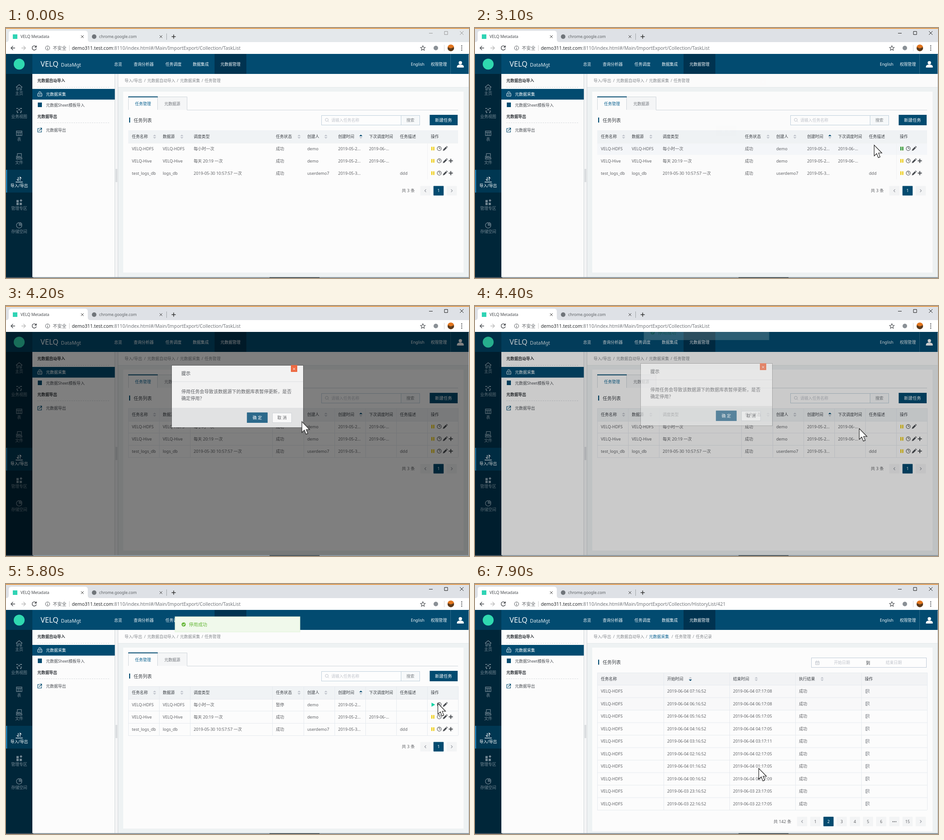
An HTML page that plays this animation: 1019x550 px, repeating every 8 s.

```html
<!DOCTYPE html>
<html lang="zh-CN">
<head>
<meta charset="utf-8">
<title>VELQ Metadata</title>
<style>
html, body { margin: 0; width: 100%; height: 100%; overflow: hidden; background: #fff; }
svg { display: block; width: 1019px; height: 550px; }
text { font-family: "Noto Sans", "Noto Sans CJK SC", "Noto Sans CJK", sans-serif; white-space: pre; }
#cursor { animation: cursor 8s linear infinite; }
#shade { animation: shade 8s linear infinite; }
#dialog { animation: dialog 8s linear infinite; }
#toast { animation: toast 8s linear infinite; }
@keyframes cursor {
  0% { transform: translate(1030px, -40px); }
  1.25% { transform: translate(1008px, 2px); }
  6.25% { transform: translate(975px, 190px); }
  11.25% { transform: translate(951px, 273px); }
  15%, 16.25% { transform: translate(958px, 262px); }
  21.25%, 22.5% { transform: translate(945px, 262px); }
  26.25%, 33.75% { transform: translate(938px, 263px); }
  38.75%, 41.25% { transform: translate(878px, 257px); }
  42.5% { transform: translate(770px, 252px); }
  47.5%, 51.25% { transform: translate(552px, 246px); }
  55% { transform: translate(845px, 269px); }
  60% { transform: translate(918px, 263px); }
  68.75%, 73.75% { transform: translate(950px, 262px); }
  82.5% { transform: translate(488px, 249px); }
  91.25%, 95% { transform: translate(779px, 521px); }
  98.75%, 100% { transform: translate(624px, 405px); }
}
@keyframes shade {
  0%, 38.75% { opacity: 0; }
  40% { opacity: .25; }
  41.25%, 52.5% { opacity: .5; }
  55% { opacity: .2; }
  57.5%, 100% { opacity: 0; }
}
@keyframes dialog {
  0%, 38.75% { opacity: 0; transform: translateY(-20px); }
  40% { opacity: .5; transform: translateY(-8px); }
  41.25% { opacity: .96; transform: none; }
  42.5%, 52.5% { opacity: 1; transform: none; }
  55% { opacity: .72; transform: translateY(-4px); }
  57.5%, 100% { opacity: 0; transform: translateY(-18px); }
}
@keyframes toast {
  0%, 53.75% { opacity: 0; transform: translateY(-33px); }
  55% { opacity: .18; transform: translateY(-31px); }
  56.25% { opacity: .55; transform: translateY(-17px); }
  57.5% { opacity: .9; transform: translateY(-7px); }
  60%, 88.75% { opacity: 1; transform: none; }
  92.5%, 100% { opacity: 0; transform: translateY(-33px); }
}
</style>
</head>
<body>
<svg id="stage" viewBox="0 0 1019 550"></svg>
<script>
const NAVY = '#024b70', TEXT = '#606266', HEAD = '#3c4046', MUTED = '#c0c4cc', LINE = '#e6eaef';
const CELL = 9.07;
const rules = [];

const rect = (x, y, w, h, fill, extra = '') =>
  `<rect x="${x}" y="${y}" width="${w}" height="${h}" fill="${fill}" ${extra}/>`;
const box = (x, y, w, h, fill, stroke) => rect(x + .5, y + .5, w - 1, h - 1, fill, `stroke="${stroke}"`);
const stroke = (d, color, width = 1, extra = '') =>
  `<path d="${d}" fill="none" stroke="${color}" stroke-width="${width}" ${extra}/>`;
const fill = (d, color) => `<path d="${d}" fill="${color}"/>`;
const dot = (x, y, r, color, extra = '') => `<circle cx="${x}" cy="${y}" r="${r}" fill="${color}" ${extra}/>`;
const at = (x, y, body) => `<g transform="translate(${x} ${y})">${body}</g>`;
// y is the middle of the line of text
const text = (x, y, s, color = TEXT, size = 8.8, extra = '') =>
  `<text x="${x}" y="${y + size * .37}" fill="${color}" font-size="${size}" ${extra}>${s}</text>`;
const mid = (x, y, s, color, size, extra = '') => text(x, y, s, color, size, 'text-anchor="middle" ' + extra);
const cell = (x, y, s) => text(x, y, s, TEXT, CELL);
const BOLD = 'font-weight="600"', MEDIUM = 'font-weight="500"';

// Shows body between two times of the 8 s loop
function during(from, to, body) {
  const name = 'span' + rules.length;
  rules.push(`@keyframes ${name}{0%{opacity:${from ? 0 : 1}}${from / 80}%{opacity:1}${to / 80}%{opacity:0}}`);
  return `<g style="animation:${name} 8s step-end infinite">${body}</g>`;
}

function windowButtons(color) {
  return stroke('M931 11.5h8M965 7.5h7v7h-7ZM999 7l8 8m0-8l-8 8', color);
}

function browser() {
  const url = 'demo311.test.com<tspan fill="#73777c">:8110/index.html#/Main/ImportExport/Collection/';
  const tab = fill('M0 31Q6 31 6 25V12Q6 6 12 6H174Q180 6 180 12V25Q180 31 186 31Z', '#fff');
  return rect(0, 0, 1019, 58, '#fff') + rect(0, 0, 1019, 31, '#e4e8eb') +
    windowButtons('#999') +
    during(2700, 8000, rect(0, 0, 1019, 31, '#dee1e6') + windowButtons('#222')) +
    rect(0, 0, 1019, 1.5, '#e58a25') + tab +
    rect(15, 14, 10, 10, '#2fd3b4') + text(32, 19, 'VELQ Metadata', '#45494d') +
    dot(194, 19, 5, '#70757a') + text(205, 19, 'chrome.google.com', '#5c6064') +
    stroke('M165 16l6 6m0-6l-6 6M338 16l6 6m0-6l-6 6', '#444') +
    stroke('M353.5 12v14', '#a0a4a8') + stroke('M364.5 19h9M369 14.5v9', '#333', 1.5) +
    stroke('M20 44H11m4.500-4.500L11 44l4.500 4.500', '#4a4d51', 1.4) +
    stroke('M34 44h9m-4.500-4.500L43 44l-4.500 4.500', '#bbb', 1.4) +
    stroke('M66 41a4.700 4.700 0 1 0 .8 4', '#4a4d51', 1.4) + fill('M67.500 38v5h-5Z', '#4a4d51') +
    dot(91.5, 44, 4.6, 'none', 'stroke="#55595d"') + stroke('M91.5 43.500v3.500M91.500 41v1.200', '#55595d', 1.2) +
    text(103, 44, '不安全', '#606468', 10) + stroke('M139.500 38v12', '#ccc') +
    during(0, 5900, text(145, 44, url + 'TaskList</tspan>', '#2b2e31', 10.37)) +
    during(5900, 8000, text(145, 44, url + 'HistoryList/421</tspan>', '#2b2e31', 10.37)) +
    stroke('M917.500 39l1.500 3.500 3.700.3-2.800 2.500.8 3.700-3.200-2-3.200 2 .8-3.700-2.800-2.500 3.700-.3Z', '#4a4d51', 1.1) +
    dot(946, 44, 5, '#8a9096') + stroke('M964.500 37v14', '#d5d8db') +
    dot(979, 44, 7.2, '#5b3a1c') + fill('M972 42a7.200 7.200 0 0 1 14 0l-7 3Z', '#e2761f') +
    [39.5, 44, 48.5].map(y => dot(1003, y, 1.2, '#4a4d51')).join('');
}

function header() {
  const nav = [[238, '总览'], [281, '查询分析器'], [351, '任务调度'], [411, '数据集成'], [472, '元数据管理'],
    [891, 'English'], [935, '权限管理']];
  return rect(0, 57, 1019, 44, NAVY) + rect(0, 57, 58, 44, '#003b59') + rect(459, 57, 70, 44, '#003350') +
    dot(29, 79.5, 12, '#2fd9b0') +
    text(76, 79.5, 'VELQ', '#f2f7fa', 16.2) + text(121, 81.5, 'DataMgt', '#e3edf2', 10.8) +
    nav.map(([x, s]) => text(x, 80, s, '#f4f8fa', 8.8, MEDIUM)).join('') +
    stroke('M978.500 57v44', '#2c6a8a') +
    dot(1000, 76.5, 3.7, '#fff') + fill('M992.500 87v-2q0-4.500 7.500-4.500t7.500 4.500v2Z', '#fff');
}

function sidebar() {
  const items = [
    ['主页', 'M-7 0L0-6 7 0M-5-1V6H-2V1H2V6H5V-1'],
    ['业务视图', 'M-6-4h3M2-4h4M-2-1h4M-6 2h3M3 2h3M-5 5h3M2 5h3M-1-4h1'],
    ['表', 'M-6-5H6V5H-6ZM-6-2H6M-2-2V5M2-2V5'],
    ['文件', 'M-4-6H5V3H-4ZM-6-1V6H6V3M-2 3V0H2V3'],
    ['导入/导出', 'M-7 5V6H7V5M-2-5V3M-5 0L-2 3M2 3V-5L5-2'],
    ['管理专区', ''],
    ['存储空间', 'M6 0A6 6 0 1 1 0-6V0ZM2-6A5 5 0 0 1 6-2H2Z'],
  ];
  const active = 4;
  return rect(0, 101, 58, 447, '#002639') + rect(0, 312, 58, 50, '#003752') + rect(0, 312, 2.5, 50, '#2180b5') +
    items.map(([label, d], i) => {
      const y = 130.5 + i * 50.6, color = i === active ? '#fff' : '#748894';
      const icon = d ? stroke(d, color, i === 1 ? 2 : 1.2)
        : rect(-6, -5, 5, 5, color) + rect(-6, 1, 5, 5, color) + rect(1, 1, 5, 5, color) + fill('M4-7l3 3-3 3-3-3Z', color);
      return at(29, y, icon) + mid(29, y + 13.5, label, color, 8.8);
    }).join('');
}

function submenu() {
  return rect(58, 101, 181, 447, '#fcfcfc') + rect(239, 101, 8, 447, '#f4f5f6') +
    stroke('M239.500 101v447M246.500 101v447', '#d2d6d9') + rect(241, 310, 4, 29, '#d9dcdf') +
    text(69, 116, '元数据自动导入', '#2f3338', 8.7, BOLD) + text(69, 195, '元数据导出', '#2f3338', 8.7, BOLD) +
    stroke('M69 130.500H228M69 208.500H228', '#d9dcdf', 1, 'stroke-dasharray="3 2"') +
    rect(58, 134, 181.5, 23.5, NAVY) + stroke('M70 144h9v6h-9ZM71 142l3-2 4 2M73 147h3', '#fff') +
    text(88, 146, '元数据采集', '#fff', 8.8, MEDIUM) +
    rect(70, 164, 9, 10, NAVY) + text(88, 169.5, '元数据Sheet模板导入', '#4c5056') +
    stroke('M74 221h-4v8h8v-4M73 226l5-5m-3.500-1h4v4', NAVY, 1.2) + text(88, 225, '元数据导出', '#4c5056');
}

const crumbs = list => list.map(([x, s, c]) => text(x, 116, s, c || '#85898e', 8.8, c ? MEDIUM : '')).join('');
const title = y => rect(271, y - 6, 2.2, 11, NAVY) + text(281, y, '任务列表', HEAD, 10);

function sorter(x, y, order) {
  return fill(`M${x - 3.5} ${y - 1}l3.500-3.500 3.500 3.500Z`, order === 'up' ? NAVY : MUTED) +
    fill(`M${x - 3.5} ${y + 1}l3.500 3.500 3.500-3.500Z`, order === 'down' ? NAVY : MUTED);
}

function pageButton(x, y, label, active) {
  const arrow = { '<': 'M1.500-3l-3 3 3 3', '>': 'M-1.500-3l3 3-3 3' }[label];
  return rect(x - 11.2, y - 10.4, 22.4, 20.8, active ? NAVY : '#f3f4f5', 'rx="1"') +
    (arrow ? at(x, y, stroke(arrow, '#9a9ea5', 1.2)) : mid(x, y, label, active ? '#fff' : TEXT, 8.8));
}

function gridLines(xs, ys) {
  const [top, bottom] = [ys[0], ys[ys.length - 1]], [left, right] = [xs[0], xs[xs.length - 1]];
  return stroke(xs.map(x => `M${x + .5} ${top}V${bottom}`).join('') + ys.map(y => `M${left} ${y + .5}H${right}`).join(''), LINE);
}

const pause = (y, color) => rect(936, y - 4, 2.6, 8, color) + rect(940.2, y - 4, 2.6, 8, color);

function rowTools(y, hasPlus) {
  const color = '#4a4d52';
  return dot(953.5, y, 4.4, 'none', `stroke="${color}" stroke-width="1.1"`) +
    at(953.5, y, stroke('M0-3V0H2.500', color)) +
    at(966.5, y, fill('M-5 5l1-3.500 5.500-5.500 2.500 2.500-5.500 5.500ZM2.300-4.700l1-1 2.500 2.500-1 1Z', color)) +
    (hasPlus ? at(979, y, stroke('M-4.500 0h9M0-4.500v9', color, 2)) : '');
}

function taskList() {
  const cols = [269, 337, 405, 586, 655, 723, 791, 859, 927, 995];
  const heads = ['任务名称', '数据源', '调度类型', '任务状态', '创建人', '创建时间', '下次调度时间', '任务描述', '操作'];
  const rows = [
    ['VELQ-HDFS', 'VELQ-HDFS', '每小时一次', '', 'demo', '2019-05-2...', ''],
    ['VELQ-Hive', 'VELQ-Hive', '每天 20:19 一次', '成功', 'demo', '2019-05-2...', '2019-06-...'],
    ['test_logs_db', 'logs_db', '2019-05-30 10:57:57 一次', '成功', 'userdemo7', '2019-05-3...', '', 'ddd'],
  ];
  const yellow = '#efcd12';
  return crumbs([[261, '导入/导出'], [304, '/'], [311, '元数据自动导入'], [376, '/'], [383, '元数据采集'], [430.5, '/'], [437, '任务管理']]) +
    rect(258, 140, 749, 398, '#fcfcfc') +
    rect(333, 151, 65, 29, '#f5f6f7') + stroke('M333 151.500H398.500V180.500H995M269.500 180V151.500M333.500 151V180', '#cfd6db') +
    rect(269, 150.5, 65, 2, NAVY) + mid(301.5, 166.5, '任务管理', '#0a6291', 8.8, MEDIUM) + mid(366, 166.5, '元数据源', '#74787e', 8.8) +
    title(203) +
    box(694, 192, 217, 22, '#fdfdfd', '#bfd0dc') + rect(869, 193, 41, 20, '#f7f9fa') + stroke('M869.500 192v21', '#bfd0dc') +
    dot(706, 202, 3.3, 'none', `stroke="${MUTED}"`) + stroke('M708.500 204.500l2 2', MUTED) +
    text(716, 203, '请输入任务名称', MUTED) + mid(890, 203, '搜索', '#7b8086', 8.8) +
    rect(932.5, 191, 61.5, 23, NAVY) + mid(963, 203, '新建任务', '#fff', 9.4, MEDIUM) +
    rect(269, 225, 726, 28, '#f0f3f5') +
    during(900, 3200, rect(269, 253, 726, 26, '#f5f7fa')) +
    stroke('M927.500 225V333M269 253.500H995', '#f0f2f4') +
    during(3200, 5900, gridLines(cols, [225, 253, 279, 306, 333])) +
    heads.map((s, i) => text(cols[i] + 8, 239, s, HEAD, 8.8, MEDIUM)).join('') +
    [327, 387, 645, 704].map(x => sorter(x, 239)).join('') + sorter(781, 239, 'up') +
    rows.map((row, r) => {
      const y = 266 + r * 27;
      return row.map((s, i) => cell(cols[i] + 8, y, s)).join('') + rowTools(y - .7, r > 0) + (r ? pause(y - .7, yellow) : '');
    }).join('') +
    during(0, 4600, cell(594, 266, '成功') + cell(799, 266, '2019-06-...') + pause(265.3, yellow)) +
    during(1900, 3200, pause(265.3, '#2b9a4b')) +
    during(4600, 5900, cell(594, 266, '暂停') + fill('M936.500 261l8 4.500-8 4.500Z', '#16d3a4')) +
    text(871, 358, '共 3 条', TEXT, 9.3) + pageButton(923, 358, '<') + pageButton(952, 358, '1', true) + pageButton(981, 358, '>');
}

function historyRows(firstHour, ends, current) {
  const labels = ['<', 1, 2, 3, 4, 5, 6, '•••', 15, '>'];
  const pad = n => String(n).padStart(2, '0');
  return ends.map((end, i) => {
    const hour = firstHour - i, stamp = `2019-06-0${hour < 0 ? 3 : 4} ${pad((hour + 24) % 24)}`, y = 236 + i * 27.5;
    return cell(423, y, stamp + ':16:52') + cell(568, y, `${stamp}:17:${pad(end)}`);
  }).join('') + labels.map((s, i) => pageButton(720 + i * 29, 522.5, s, s === current)).join('');
}

function history() {
  const cols = [269, 415, 560, 705, 850, 995];
  const ys = [195, ...Array.from({ length: 11 }, (_, i) => 222 + i * 27.5)];
  const heads = ['任务名称', '开始时间', '结束时间', '执行结果', '操作'];
  const row = y => cell(277, y, 'VELQ-HDFS') + cell(713, y, '成功') +
    at(864, y, stroke('M3.500-1.500V-4h-7.500v8h4M-2-4v8', '#8d9197') + dot(1.5, 0, 1.8, 'none', 'stroke="#8d9197"') + stroke('M2.500 1.500l2 2.500', '#8d9197'));
  return rect(247, 101, 772, 29, '#fcfcfc') +
    crumbs([[261, '导入/导出'], [304, '/'], [311, '元数据自动导入'], [376, '/'], [383, '元数据采集', '#0a6291'], [432.5, '/'],
      [440, '任务管理'], [479, '/'], [486, '任务记录']]) +
    rect(258, 140, 749, 404, '#fcfcfc') + title(172.5) +
    box(740, 162, 254, 22, '#fdfdfd', '#bfcbd8') +
    stroke('M749.500 170.500h8v7h-8ZM749 172.500h9M751.500 168.500v2M755.500 168.500v2M751 175h5', MUTED) +
    text(790, 173, '开始日期', MUTED) + mid(865, 173, '到', HEAD, 9.5) + text(904, 173, '结束日期', MUTED) +
    rect(269, 195, 726, 27, '#f2f3f5') + rect(269, 222, 726, 55, '#f8f8f9') + gridLines(cols, ys) +
    heads.map((s, i) => text(cols[i] + 8, 209, s, HEAD, 8.8, MEDIUM)).join('') +
    sorter(474, 209, 'down') + sorter(619, 209) + sorter(764, 209) +
    ys.slice(1, 11).map(y => row(y + 14)).join('') + text(657, 522.5, '共 142 条', TEXT, 9.3) +
    during(0, 7600, historyRows(17, [5, 5, 5, 5, 5, 5, 5, 5, 5, 4], 1)) +
    during(7600, 8000, historyRows(7, [8, 8, 5, 5, 11, 5, 5, 9, 5, 5], 2));
}

function dialog() {
  return rect(364, 130, 291, 138, '#000', 'opacity=".25"') + rect(365, 131, 289, 136, '#f3f3f3') +
    rect(365, 224, 289, 43, '#e2e3e4') + stroke('M365 166.500H654', '#dfe1e3') +
    text(386, 148, '提示', '#3d4146', 10) +
    rect(627, 130, 14, 15, '#ee6a43') + stroke('M631.500 136l5 5m0-5l-5 5', '#fff') +
    text(386, 188.5, '停用任务会导致该数据源下的数据库表暂停更新，是否', TEXT, 10.1) + text(386, 203, '确定停用？', TEXT, 10.1) +
    rect(530.5, 234.5, 45, 22.5, NAVY) + during(3700, 8000, rect(530.5, 234.5, 45, 22.5, '#2d6a8c')) +
    mid(553, 246, '确 定', '#fff', 9, MEDIUM) +
    box(586, 235, 43, 22, '#fafafa', '#d0d4d8') + mid(607.5, 246, '取 消', TEXT, 9);
}

function toast() {
  return box(371.5, 71.5, 276, 34.5, '#f0f9eb', '#e1f3d8') +
    dot(391, 89, 4.6, '#67b83a') + stroke('M388.800 89l1.700 1.700 3-3.200', '#fff', 1.1) + text(402.5, 89, '停用成功', '#67b83a', 10.1);
}

document.getElementById('stage').innerHTML =
  '<clipPath id="page"><rect y="57" width="1019" height="491"/></clipPath>' +
  rect(0, 0, 1019, 550, '#eef2f3') + browser() + rect(247, 101, 772, 29, '#fcfcfc') + stroke('M247 130.500H1019', '#e3e8ea') +
  header() + sidebar() + submenu() +
  during(0, 5900, taskList()) + during(5900, 8000, history()) +
  rect(0, 548, 1019, 2, '#8b98a1') + rect(0, 548, 60, 2, '#43505a') + rect(580, 548, 110, 2, '#4d5960') + rect(1018, 58, 1, 490, '#b8bec3') +
  `<g clip-path="url(#page)"><g id="shade">${rect(0, 57, 1018, 491, '#000')}</g>` +
  `<g id="dialog">${dialog()}</g><g id="toast">${toast()}</g></g>` +
  `<g id="cursor"><path d="M.5.5V24.500L6 19.300 9.600 28.300 13.600 26.600 10 18H17.500Z" fill="#fff" stroke="#111" stroke-width="1.100"/></g>`;
document.head.appendChild(document.createElement('style')).textContent = rules.join('');
</script>
</body>
</html>
```
